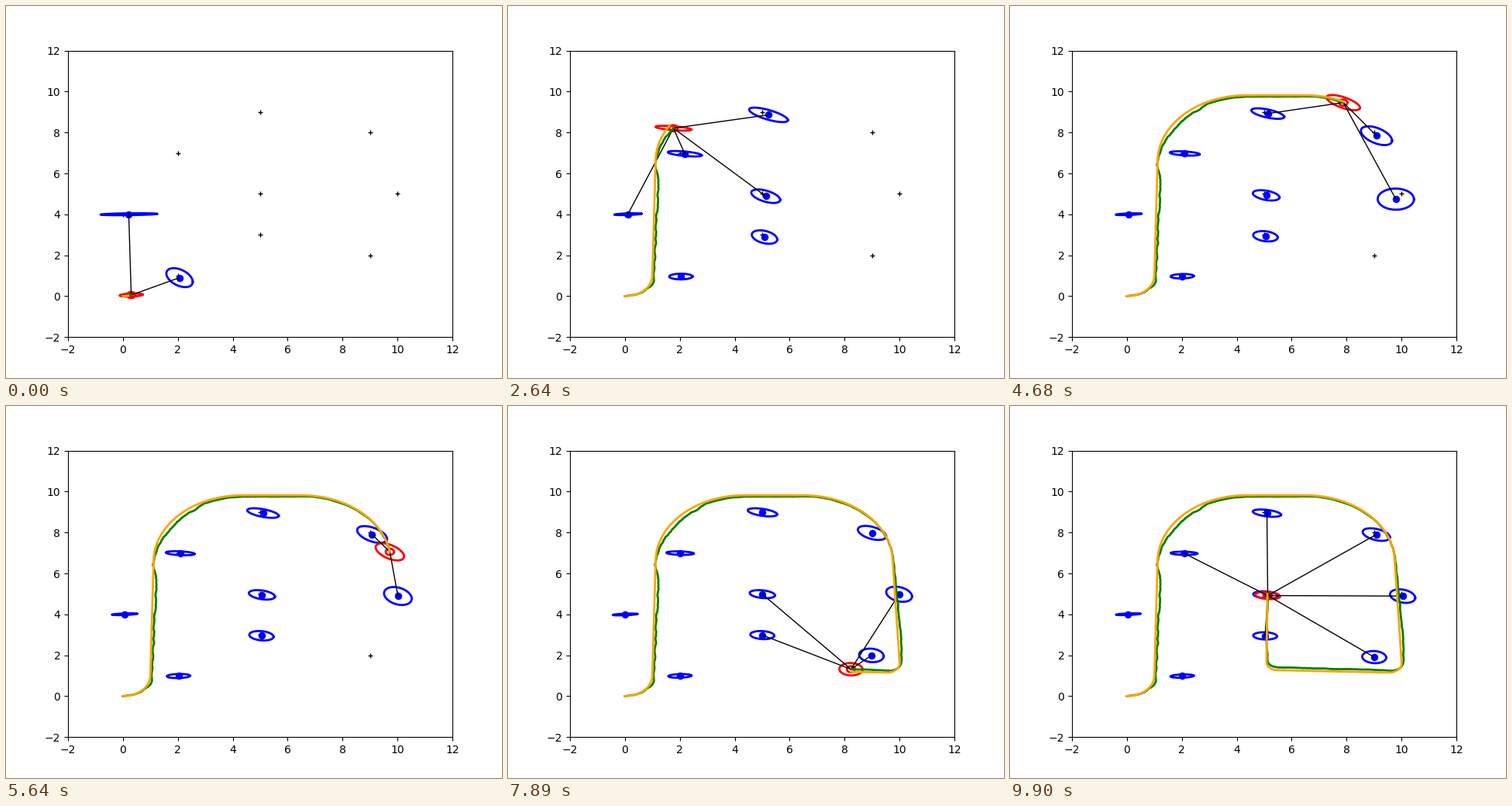
Animation, 640 px wide and 480 px high, one loop 9930 ms. Source, as a matplotlib script:

```python
import numpy as np
import matplotlib.pyplot as plt
from matplotlib.animation import FuncAnimation

FRAMES, INTERVAL = 331, 30
STEP = 0.1            # distance driven per frame
SIGHT = 5.0           # sensor range
BEARING = -0.06       # bearing error when a landmark is first seen
rng = np.random.default_rng(4)
ticks = np.arange(FRAMES)


def drive():
    """True positions, one per step, along straights and circular arcs."""
    # (length, change of heading)
    legs = [(1.55, 1.55), (5.68, 0), (5.0, -1.55), (2.17, 0), (4.92, -1.52),
            (5.12, 0), (0.75, -1.65), (4.08, 0), (0.6, -1.551), (4.0, 0)]
    length, turn = np.array(legs).T
    ds = 0.005
    ends = np.r_[0, np.cumsum(length)]
    bearing = np.r_[0, np.cumsum(turn)]
    s = np.arange(0, 33.4, ds)
    theta = np.interp(s + ds / 2, ends, bearing)
    x = np.r_[0, np.cumsum(np.cos(theta)) * ds]
    y = np.r_[0, np.cumsum(np.sin(theta)) * ds]
    every = round(STEP / ds)
    return np.column_stack([x, y])[::every]


def follow(keys):
    """Linear motion through key points (frame, value, ...)."""
    t, *values = np.array(keys).T
    return np.column_stack([np.interp(ticks, t, v) for v in values])


truth = drive()
true_pose = truth[2:FRAMES + 2]

# Error of the estimated position
drift = follow([(0, .11, .03), (12, .05, -.05), (56, .13, .05), (68, 0, 0),
                (90, .15, -.15), (115, .02, -.07), (180, 0, -.03),
                (229, .11, .12), (247, .06, .08), (262, 0, .13),
                (290, .08, .13), (305, 0, .02), (330, .02, -.08)])
noise = rng.normal(size=(FRAMES + 2, 2))
noise = (noise[:-2] + noise[1:-1] + noise[2:]) / 3
pose = true_pose + drift + noise * (0.012 + 0.018 * (ticks < 110))[:, None]
trail = np.vstack([[0, 0], pose])

# The estimated map is slightly rotated and shakes a little
tilt = follow([(0, .01), (54, -.022), (124, -.018), (188, -.009),
               (229, -.002), (293, .001), (330, -.011)])[:, 0]
shake = rng.normal(size=(FRAMES, 2)) * 0.008

marks = np.array([(2, 1), (0, 4), (2, 7), (5, 5), (5, 3),
                  (5, 9), (9, 8), (10, 5), (9, 2)], float)
gap = np.linalg.norm(true_pose[:, None] - marks[None], axis=2)
in_sight = gap < SIGHT
first_seen = in_sight.argmax(axis=0)

TURN = np.linspace(0, 2 * np.pi, 73)


def spread(point, n):
    """Covariance from a fixed part and a heading error that shrinks."""
    x, y = point
    heading = 0.36 / (n + 8)
    fixed = np.array([[0.176, 0.01], [0.01, 0.0018]])
    return fixed + heading * np.array([[y * y, -x * y], [-x * y, x * x]])


def ellipse(center, cov):
    return center[:, None] + np.linalg.cholesky(cov) @ [np.cos(TURN), np.sin(TURN)]


def landmark(i, n):
    """Estimated place and covariance; both settle after the first sighting."""
    x, y = marks[i]
    dx, dy = marks[i] - true_pose[first_seen[i]]
    side = np.array([-dy, dx])
    fade = 1 / (1 + (n - first_seen[i]) / 6)
    center = marks[i] + tilt[n] * np.array([-y, x]) + shake[n]
    center = center + BEARING * fade * side
    return center, spread(marks[i], n) + 0.01 * fade * np.outer(side, side)


fig, ax = plt.subplots(figsize=(6.4, 4.8), dpi=100)
ax.set_xlim(-2, 12)
ax.set_ylim(-2, 12)


def line(color, width, level):
    return ax.plot([], [], color=color, lw=width, zorder=level)[0]


ax.plot(*marks.T, "k+", ms=4.47, mew=1, zorder=1)
rings = [line("blue", 2, 1.2) for _ in marks]
dots, = ax.plot([], [], "o", color="blue", ms=5.8, zorder=1.3)
pose_ring = line("red", 2, 1.4)
body = line("red", 2, 1.5)
rays = [line("black", 1, 2) for _ in marks]
guess = line("green", 2, 2.1)
real = line("orange", 2, 2.2)


def draw(n):
    here = pose[n]
    known = []
    for i, (ring, ray) in enumerate(zip(rings, rays)):
        ring.set_data([], [])
        ray.set_data([], [])
        if n < first_seen[i]:
            continue
        center, cov = landmark(i, n)
        known.append(center)
        ring.set_data(*ellipse(center, cov))
        if in_sight[n, i]:
            ray.set_data(*np.array([here, center]).T)
    dots.set_data(*np.array(known).T)
    pose_ring.set_data(*ellipse(here, spread(here, n)))
    body.set_data(*ellipse(here, 0.15 ** 2 * np.eye(2)))
    guess.set_data(*trail[:n + 2].T)
    real.set_data(*truth[:n + 3].T)
    return [*rings, *rays, dots, pose_ring, body, guess, real]


anim = FuncAnimation(fig, draw, frames=FRAMES, interval=INTERVAL,
                     init_func=lambda: draw(0), repeat=True, repeat_delay=0)
plt.show()
```
